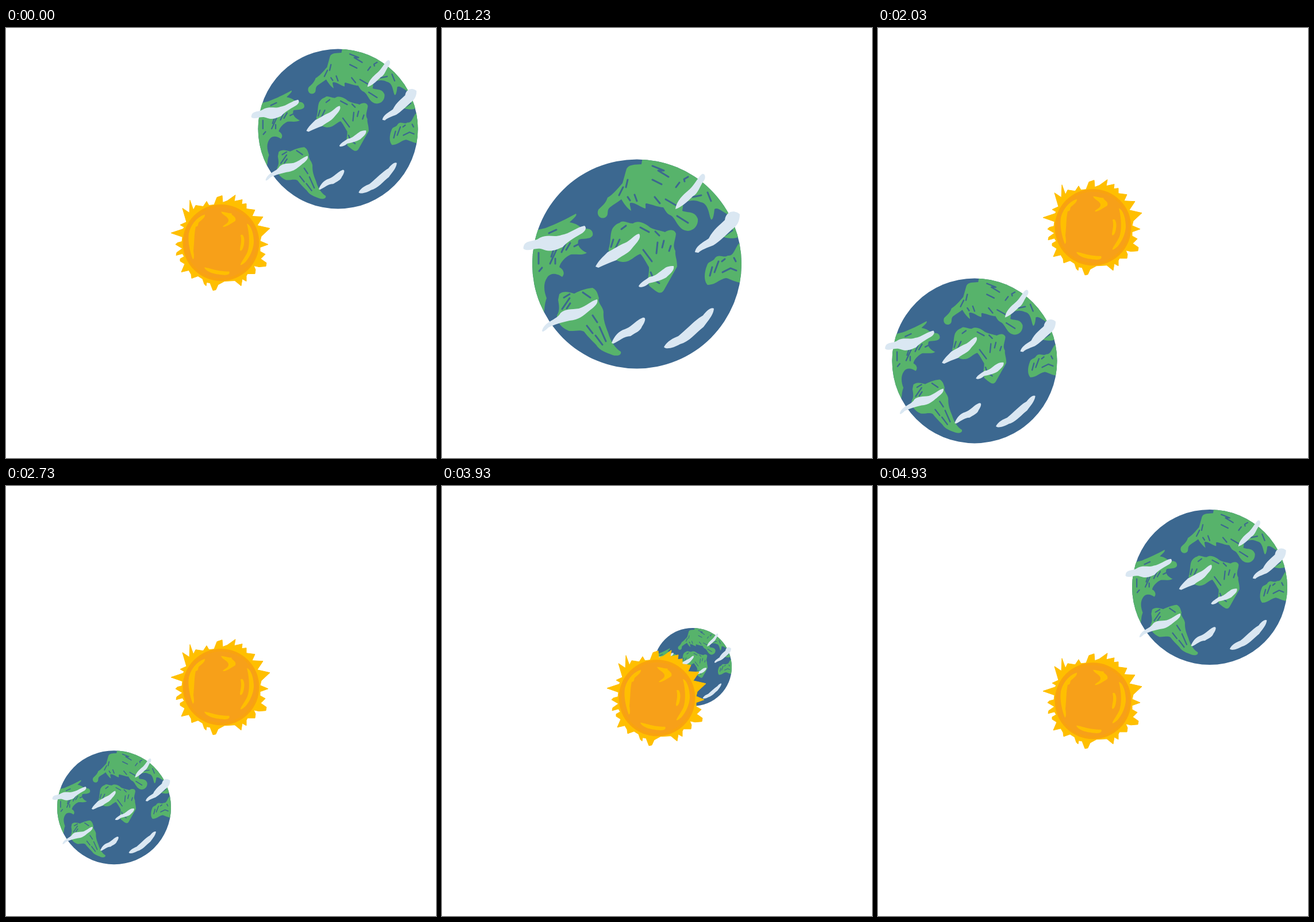
An HTML page for the animation above (5010 ms loop, 748 px wide and 748 px high).

```html
<!DOCTYPE html>
<html>
<head>
<meta charset="utf-8">
<style>
  html, body { margin: 0; width: 100%; height: 100%; overflow: hidden; background: #fff; }
  svg { display: block; width: 100%; height: 100%; }
  .land { fill: #57b36b; }
  .marks { fill: none; stroke: #3c6890; stroke-width: 3; stroke-linecap: round; stroke-linejoin: round; }
  .clouds { fill: #dae7f2; }
</style>
</head>
<body>
<svg viewBox="0 0 748 748">
  <clipPath id="globe"><circle cx="339" cy="410.5" r="182"/></clipPath>

  <g id="sun">
    <path fill="#ffbf00" stroke="#ffbf00" stroke-linejoin="round" d="M376 292L377 304 385 301 399 291 397 302 411 299 410 307 418 306 418 315 433 317 428 328 447 329 437 344 459 349 444 363 442 371 456 377 442 382 442 389 451 394 443 402 453 409 452 415 440 416 431 414 434 421 433 428 420 428 418 432 418 441 411 437 409 449 398 440 380 441 369 447 365 456 360 457 355 444 349 443 348 449 345 446 342 437 334 432 323 436 322 429 318 422 305 425 311 411 303 406 303 402 310 398 307 393 296 396 297 391 307 384 295 377 298 374 306 372 307 364 287 357 308 350 310 347 303 343 314 338 307 314 319 322 320 300 326 317 330 309 343 311 349 302 353 309 362 308 367 295Z"/>
    <circle cx="374" cy="374" r="66.5" fill="#f9a30e"/>
    <circle cx="374" cy="374" r="62" fill="#f7a019"/>
    <g fill="#ffbf00">
      <path d="M346 325C335 328 322 340 318 358C316 372 320 390 325 403C328 402 327 395 326 388C328 370 327 360 330 346C336 346 333 340 336 338C342 333 347 329 346 325Z"/>
      <path d="M374 320C380 320 386 323 393 323C390 326 402 328 399 336C390 342 380 348 377 346C380 342 388 340 387 334C386 328 376 326 374 320Z"/>
      <path d="M419 341C424 342 430 352 431 370C432 385 420 410 408 413C407 410 417 398 420 390C424 380 424 360 419 341Z"/>
      <path d="M408 361C412 357 416 365 414 376C413 385 409 390 407 387C407 380 411 372 408 361Z"/>
      <path d="M345 417C352 417 365 424 388 424C391 428 385 431 378 430C363 429 348 425 345 417Z"/>
    </g>
  </g>

  <g id="earth">
    <circle cx="339" cy="410.5" r="182" fill="#3c6890"/>
    <g clip-path="url(#globe)">
      <g class="land">
        <path d="M349 225L347 237C335 238 325 237 321 245L314 270C305 280 297 290 288 295C285 305 278 310 272 316C268 325 275 333 283 330C292 326 285 318 292 312C300 306 307 302 312 298C318 308 324 315 329 318C328 310 325 306 328 304C338 304 345 312 354 314C355 308 352 306 356 305C368 308 378 312 385 312C391 322 392 323 398 326C408 332 410 352 428 353C440 352 446 342 445 332C440 318 428 322 418 318L420 303C432 300 440 298 450 303C464 305 464 325 468 333Q472 335 474 315C480 311 488 320 500 326L500 225Z"/>
        <path d="M150 355L180 348C200 340 215 333 233 323C236 326 228 332 222 338C235 340 240 346 246 350C256 347 264 352 262 361C258 368 246 366 238 368C234 375 238 385 252 391C245 396 232 393 224 394C215 398 206 407 204 416C212 420 214 428 209 433C202 428 190 424 183 434C175 445 178 460 182 470C178 480 179 488 177 496L150 480Z"/>
        <path d="M309 339C315 333 322 340 332 340C342 333 355 341 362 347C372 352 380 352 388 355C395 350 405 350 407 358C406 370 400 378 406 388C405 396 409 402 409 415L386 456C380 466 372 458 361 449C355 440 361 428 360 416C355 408 350 398 345 393C335 396 328 407 316 407C302 408 288 392 290 384C294 372 292 360 296 350C300 343 305 340 309 339Z"/>
        <path d="M204 463C212 456 222 460 230 462C238 458 250 453 262 452C270 456 271 464 273 470C270 478 280 484 281 494C280 508 285 520 289 530C293 545 302 558 311 563C313 570 303 571 297 569C285 564 275 562 268 551C260 543 252 535 247 528C240 524 230 528 221 527C208 522 200 512 200 500C206 490 203 480 202 473Z"/>
        <path d="M461 413C463 405 472 407 475 400C482 392 490 401 497 396C508 397 508 385 517 374L525 380V446L518 443C505 440 500 436 494 435C480 438 478 446 462 447C455 440 456 425 461 413Z"/>
        <path d="M486 362C492 354 500 352 508 345L520 350 515 364C505 368 492 365 486 362Z"/>
      </g>
      <g class="marks">
        <path d="M366 240L386 248 376 248 394 259M366 264L382 272M428 259L421 263 422 267M407 277L413 269M370 294L379 305M389 298L408 309M315 277L308 291M323 264L320 277M323 294L327 300M335 290L339 301M436 294L451 291M462 286L468 301M409 327L428 339"/>
        <path d="M168 391V410M186 357L199 351M199 386L188 410M194 386L190 398M215 375L208 390M223 374L216 386M238 376L230 380M169 423L174 417M197 401V410"/>
        <path d="M320 344L312 350M345 347L360 355M298 368L294 381M309 368L301 385M371 354L378 361M375 373L373 392M386 370L383 382M350 386L365 406M398 379L395 388M386 431L397 421M363 425L368 437 378 444"/>
        <path d="M212 469L222 463M245 460L258 469M209 489L222 470M217 488L223 479M262 500L270 512M252 518L262 531M274 520L285 545M267 535L279 551"/>
        <path d="M470 416L466 431M481 406L474 425M492 402L487 406M488 425L502 418 512 422M508 400L511 406M493 360L505 352"/>
      </g>
    </g>
    <g class="clouds">
      <path d="M142 380C145 368 160 373 170 365C185 358 195 365 208 360C222 358 235 346 248 344C253 348 248 355 242 358C228 366 218 372 210 381C198 386 190 390 178 386C165 380 155 388 146 386C141 385 141 383 142 380Z"/>
      <path d="M174 527C178 510 200 508 206 496C214 488 225 490 238 488C250 485 260 474 270 472C273 480 262 487 256 492C246 500 238 508 222 509C208 512 195 516 185 521C180 526 175 530 174 527Z"/>
      <path d="M267 415C272 405 280 398 288 390C300 384 308 378 318 374C328 370 336 358 343 358C348 366 336 376 330 384C322 394 312 396 303 404C292 408 282 412 272 417Z"/>
      <path d="M342 449C346 442 354 438 361 433C372 432 378 424 386 419C392 414 398 414 403 414C405 422 396 428 390 434C380 440 368 442 360 444C354 450 344 453 342 449Z"/>
      <path d="M295 548C300 535 308 527 318 524C330 520 338 508 349 504C357 502 352 514 348 519C345 528 336 530 328 536C316 536 308 545 298 549Z"/>
      <path d="M386 555C392 544 402 540 411 536C428 522 440 508 454 500C460 492 468 485 473 488C472 500 462 510 455 520C442 530 430 546 414 550C404 556 390 560 386 555Z"/>
      <path d="M440 390C442 378 456 372 464 366C472 350 484 342 492 334C494 318 510 316 518 324C518 340 510 346 505 350C494 360 482 372 472 378C462 382 450 386 446 391Z"/>
      <path d="M406 315C408 300 420 290 428 283C438 275 444 262 450 256C456 250 460 258 456 265C448 275 446 288 436 293C425 304 416 312 406 315Z"/>
    </g>
  </g>
</svg>
<script>
const LOOP = 5010, STEPS = 100;
const svg = document.querySelector('svg');
const sun = document.getElementById('sun');
const earth = document.getElementById('earth');

// Orbit keys: step, centre x, radius
const orbit = [
  [0, 577.5, 139], [11, 515, 167], [16, 457, 174], [22, 376, 181], [25, 339, 182],
  [33, 236, 166], [41, 168, 143.5], [44, 158, 133], [55, 188, 99], [66, 289, 68],
  [77, 413, 65], [79, 436, 68], [88, 526, 95], [99, 577, 135]
];

// Key i of the endless orbit
function key(i) {
  const n = orbit.length, turn = Math.floor(i / n);
  const [step, x, r] = orbit[i - turn * n];
  return [step + turn * STEPS, x, r];
}

// Smooth periodic curve through the keys; column 1 is x, 2 is radius
function sample(step, column) {
  const i = orbit.findLastIndex(k => k[0] <= step);
  const [a, b, c, d] = [i - 1, i, i + 1, i + 2].map(key);
  const span = c[0] - b[0], u = (step - b[0]) / span;
  const slope = (p, q) => (q[column] - p[column]) / (q[0] - p[0]) * span;
  const v = 1 - u;
  return b[column] * v * v * (1 + 2 * u) + slope(a, c) * u * v * v
       + c[column] * u * u * (3 - 2 * u) - slope(b, d) * u * u * v;
}

function draw(now) {
  const t = now % LOOP;
  // Two poses per 100 ms, held for 30 and 70 ms
  const step = Math.min(STEPS - 1, 2 * Math.floor(t / 100) + (t % 100 >= 30 ? 1 : 0));

  const bob = -14 * (1 + Math.cos(2 * Math.PI * (step - 44) / STEPS));
  sun.setAttribute('transform', `translate(0 ${bob + 0.5})`);

  const x = sample(step, 1), y = 374 + 0.985 * (376 - x);
  const scale = sample(step, 2) / 182;
  earth.setAttribute('transform', `translate(${x} ${y}) scale(${scale}) translate(-339 -410.5)`);

  const front = step < 50 ? earth : sun;
  if (svg.lastElementChild !== front) svg.append(front);
  requestAnimationFrame(draw);
}

const start = performance.now();
const tick = draw;
draw(0);
</script>
</body>
</html>
```
